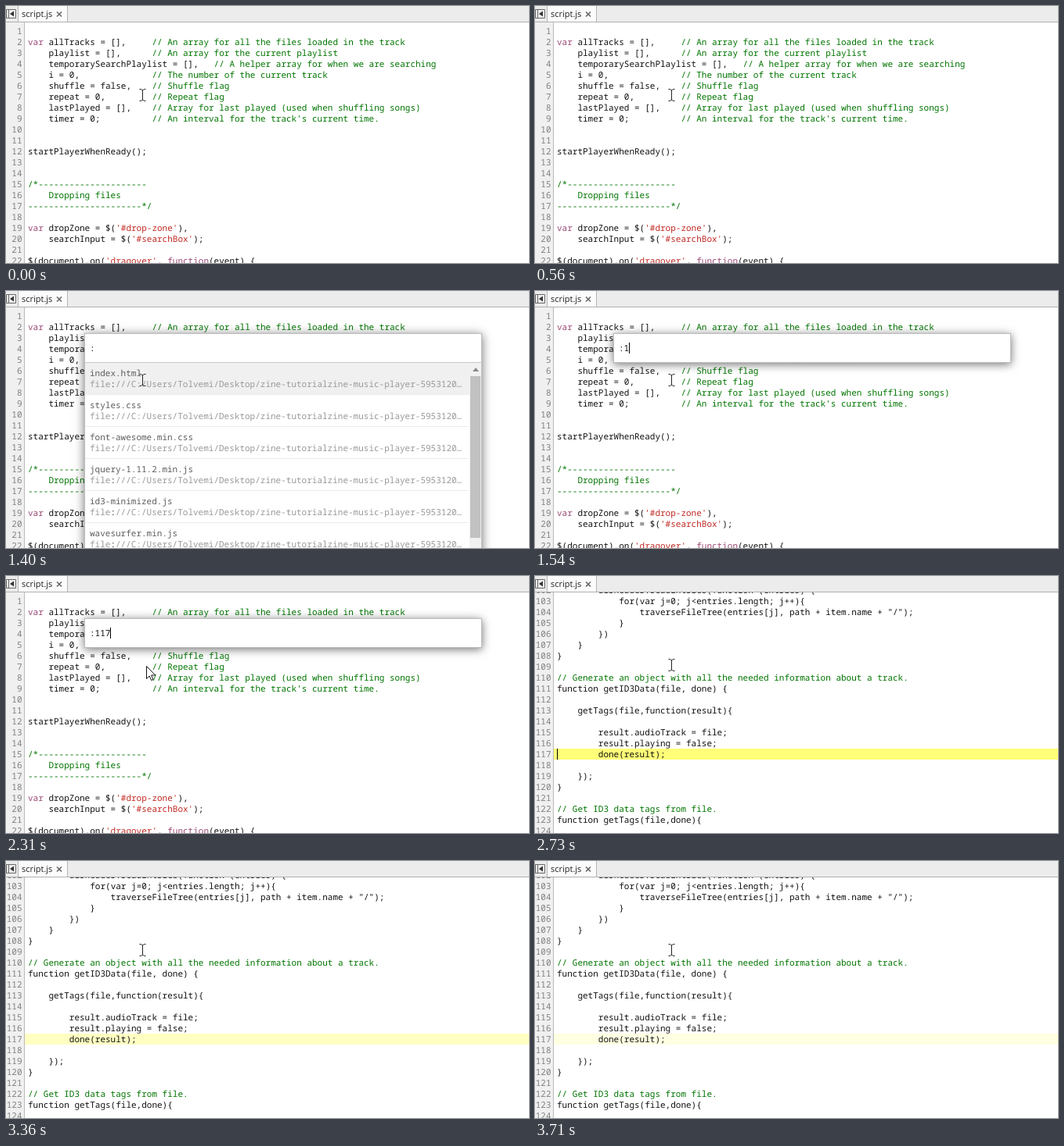
An HTML page for the animation above (3.78 s loop, 668x329 px).

```html
<!DOCTYPE html>
<html lang="en">
<head>
<meta charset="utf-8">
<title>Go to line</title>
<style>
html, body { margin: 0; width: 100%; height: 100%; overflow: hidden; background: #fff; }
#stage { position: relative; width: 668px; height: 329px; overflow: hidden; background: #fff; }
#stage, #stage * { box-sizing: border-box; }
#stage { font: 11px/14px "Noto Sans Mono", "Liberation Mono", monospace; color: #111; text-rendering: geometricPrecision; font-variant-ligatures: none; }
#stage div, #stage svg { position: absolute; }
#gutter { left: 0; top: 21px; width: 24px; height: 308px; background: #f0f0f0; border-right: 1px solid #bbb; }
.view { inset: 0; white-space: pre; }
.num { left: 0; width: 20.5px; text-align: right; color: #808080; }
.code { left: 28px; }
.c { color: #007400; }
#start .k { color: #9c4a76; }
#start .s { color: #c02a24; }
#glow { left: 24px; top: 221px; width: 644px; height: 14px; }
.caret { width: 1px; height: 14px; background: #000; }
#bar { left: 0; top: 0; width: 668px; height: 21px; background: #ececec; border-bottom: 1px solid #b0b0b0; }
#tab { left: 15px; top: 0; width: 64px; height: 20px; padding: 4px 0 0 4px; background: #fbfbfb; border: solid #b4b4b4; border-width: 0 1px; color: #222; font: 11px/14px "Open Sans", sans-serif; }
#bar svg { left: 0; top: 0; }
#dialog { left: 100px; top: 54px; width: 508px; height: 38px; background: #fff; border: 1px solid #bbb; box-shadow: 0 2px 12px rgba(0,0,0,.55); }
#dialog.open { height: 320px; }
#query { left: 6px; top: 12px; white-space: pre; }
#list { left: 0; top: 36px; width: 506px; height: 290px; border-top: 1px solid #c8c8c8; }
.item { left: 0; width: 491px; height: 41px; padding: 7px 0 0 6px; border-bottom: 1px solid #ececec; color: #5e5e5e; white-space: pre; }
.item:first-child { background: #f0f0f0; }
.item span { color: #999; } .item b { color: #333; font-weight: 400; }
#scroll { left: 491px; top: 0; width: 15px; height: 290px; background: #f1f1f1; }
#thumb { left: 1px; top: 17px; width: 13px; height: 207px; background: #c1c1c1; }
#arrowUp { left: 4px; top: 6px; border: 4px solid transparent; border-top: 0; border-bottom: 5px solid #8a8a8a; }
</style>
</head>
<body>
<div id="stage">
  <div id="gutter"></div>
  <div id="glow"></div>
  <div class="view" id="start"></div>
  <div class="view" id="found"></div>
  <div class="caret" id="caret"></div>
  <div id="bar">
    <div id="tab">script.js</div>
    <svg width="80" height="20">
      <path d="M.5 4.5H12.5V15.5H.5ZM3.5 5V15" fill="none" stroke="#6a6a6a"/>
      <path d="M10 6.5V13.5L5 10Z" fill="#333"/>
      <path d="M65 7.5L71 13.5M71 7.5L65 13.5" stroke="#666" stroke-width="1.6"/>
    </svg>
  </div>
  <div id="dialog">
    <div id="query"></div>
    <div id="list"></div>
  </div>
  <div class="caret" id="inputCaret"></div>
  <svg id="beam" width="12" height="18" style="left:168px;top:105px">
    <path d="M2.5 1.5H4.5L6.5 3L8.5 1.5H10.5M6.5 2.5V15.5M2.5 16.5H4.5L6.5 15L8.5 16.5H10.5" fill="none" stroke="#222"/>
  </svg>
  <svg id="arrow" width="14" height="20" style="left:179px;top:115px">
    <path d="M.5.5V16.5L4.2 13L6.6 18.5L9 17.5L6.7 12H11.7Z" fill="#fff" stroke="#111"/>
  </svg>
</div>
<script>
const $ = id => document.getElementById(id);
const LOOP = 3780, CHAR = 6.6;

const startCode = `
var allTracks = [],     // An array for all the files loaded in the track
    playlist = [],      // An array for the current playlist
    temporarySearchPlaylist = [],   // A helper array for when we are searching
    i = 0,              // The number of the current track
    shuffle = false,    // Shuffle flag
    repeat = 0,         // Repeat flag
    lastPlayed = [],    // Array for last played (used when shuffling songs)
    timer = 0;          // An interval for the track's current time.


startPlayerWhenReady();


/*---------------------
    Dropping files
----------------------*/

var dropZone = $('#drop-zone'),
    searchInput = $('#searchBox');

$(document).on('dragover', function(event) {`;

const foundCode = `        dirReader.readEntries(function (entries) {
            for(var j=0; j<entries.length; j++){
                traverseFileTree(entries[j], path + item.name + "/");
            }
        })
    }
}

// Generate an object with all the needed information about a track.
function getID3Data(file, done) {

    getTags(file,function(result){

        result.audioTrack = file;
        result.playing = false;
        done(result);

    });
}

// Get ID3 data tags from file.
function getTags(file,done){
`;

const token = /(\/\/.*|\/\*[\s\S]*?\*\/)|('[^'\n]*'|"[^"\n]*")|\b(?:var|function|for)\b/g;

function highlight(code) {
  const escaped = code.replace(/&/g, "&amp;").replace(/</g, "&lt;");
  return escaped.replace(token, (text, comment, string) => {
    const kind = comment ? "c" : string ? "s" : "k";
    return `<span class="${kind}">${text}</span>`;
  });
}

function fillView(id, code, firstLine, top) {
  const numbers = code.split("\n").map((_, i) => firstLine + i).join("\n");
  $(id).innerHTML = `<div class="num" style="top:${top}px">${numbers}</div>` +
    `<div class="code" style="top:${top}px">${highlight(code)}</div>`;
}

fillView("start", startCode, 1, 26);
fillView("found", foundCode, 102, 12);

const files = ["index.html", "styles.css", "font-awesome.min.css", "jquery-1.11.2.min.js", "id3-minimized.js", "wavesurfer.min.js"];
const folder = "file<b>:</b>///C:/Users/Tolvemi/Desktop/zine-tutorialzine-music-player-5953120…";
$("list").innerHTML = files.map((name, i) =>
  `<div class="item" style="top:${i * 41}px">${name}\n<span>${folder}</span></div>`).join("") +
  '<div id="scroll"><div id="arrowUp"></div><div id="thumb"></div></div>';

// Each track is a list of [start time, value]; values hold until the next one.
const tracks = {
  query: [[0, ""], [910, ":"], [1540, ":1"], [1610, ":11"], [2310, ":117"], [2730, ""]],
  inputCaret: [[0, 0], [910, 1], [1400, 0], [1540, 1], [2100, 0], [2310, 1], [2730, 0]],
  caret: [[0, 0], [140, 1], [560, 0], [2730, 1], [3220, 0]],
  arrow: [[0, 0], [2170, 1], [2730, 0]],
  blue: [[0, 255], [2730, 120], [2800, 123], [2870, 127], [2940, 133], [3010, 141], [3080, 152],
    [3150, 166], [3220, 194], [3570, 214], [3640, 220], [3710, 226]]
};

const valueAt = (track, t) => track.filter(step => step[0] <= t).pop()[1];
const show = (id, on) => { $(id).style.visibility = on ? "visible" : "hidden"; };
const place = (id, x, y) => { $(id).style.left = x + "px"; $(id).style.top = y + "px"; };

function render(t) {
  const now = {};
  for (const name in tracks) now[name] = valueAt(tracks[name], t);
  const jumped = t >= 2730;
  show("start", !jumped);
  show("found", jumped);
  show("caret", now.caret);
  place("caret", jumped ? 28 : 186, jumped ? 221 : 109);
  $("glow").style.background = `rgb(255,255,${now.blue})`;

  const listOpen = now.query === ":";
  show("dialog", now.query);
  show("list", listOpen);
  $("dialog").classList.toggle("open", listOpen);
  $("query").textContent = now.query;
  show("inputCaret", now.inputCaret);
  place("inputCaret", Math.round(107 + now.query.length * CHAR), 66);
  show("arrow", now.arrow);
  show("beam", !now.arrow);
}

const began = performance.now();
function tick() {
  render((performance.now() - began) % LOOP);
  requestAnimationFrame(tick);
}
tick();
</script>
</body>
</html>
```
